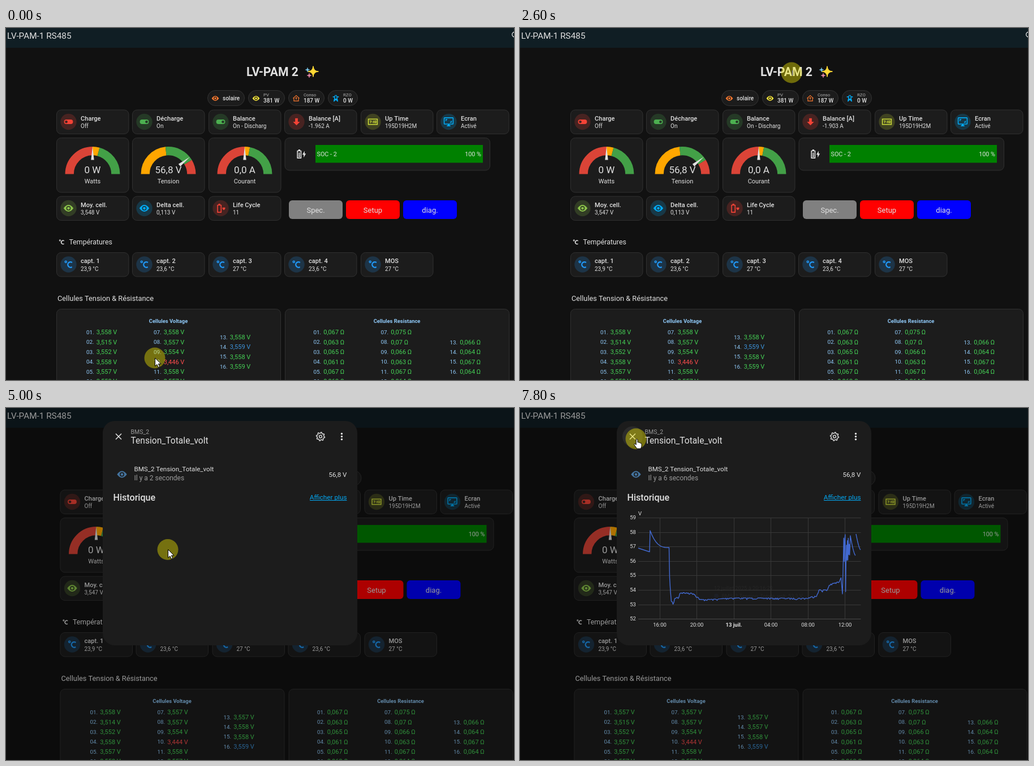
Animation, 898 px wide and 623 px high, one loop 8000 ms. Source, as an HTML page with a canvas:

```html
<!DOCTYPE html>
<html lang="fr">
<head>
<meta charset="utf-8">
<title>Tableau de bord batterie</title>
<style>
html, body { margin: 0; width: 100%; height: 100%; overflow: hidden; background: #111; }
canvas { display: block; }
</style>
</head>
<body>
<canvas id="stage" width="898" height="623"></canvas>
<script>
const g = document.getElementById('stage').getContext('2d');
const LOOP = 8000, STEP = 200, OPEN = 5000, LOADED = 5400;
const TAU = Math.PI * 2, RAD = Math.PI / 180;
const INK = '#e1e1e1', RED = '#f44336', GREEN = '#4caf50', BLUE = '#2196f3';
const ORANGE = '#ff7a2f', YELLOW = '#ffeb3b', SKY = '#03a9f4', LINE = '#4269d0';

function text(s, x, y, size, color = INK, weight = 400, align = 'left') {
  g.font = `${weight} ${size}px Roboto, sans-serif`;
  g.textAlign = align;
  g.fillStyle = color;
  g.fillText(s, x, y + size * 0.355);
}
function box(x, y, w, h, r, fill, border) {
  g.beginPath();
  g.roundRect(x, y, w, h, r);
  g.fillStyle = fill;
  g.fill();
  if (border) { g.strokeStyle = border; g.lineWidth = 1; g.stroke(); }
}
function disc(x, y, r, fill) {
  g.beginPath();
  g.arc(x, y, r, 0, TAU);
  g.fillStyle = fill;
  g.fill();
}
function circle(x, y, r, color) {
  g.beginPath();
  g.arc(x, y, r, 0, TAU);
  g.strokeStyle = color;
  g.lineWidth = 1.4;
  g.stroke();
}
function polyline(pts) {
  g.beginPath();
  pts.forEach(([x, y]) => g.lineTo(x, y));
}
function segment(x1, y1, x2, y2, color, width = 1) {
  polyline([[x1, y1], [x2, y2]]);
  g.strokeStyle = color;
  g.lineWidth = width;
  g.stroke();
}

// icons live on a 24 unit grid and are filled even-odd
const bar = (x, y, w, h, r = 0) => g.roundRect(x, y, w, h, r);
const ring = (x, y, r) => { g.moveTo(x + r, y); g.arc(x, y, r, 0, TAU); };
function poly(...p) {
  g.moveTo(p[0], p[1]);
  for (let i = 2; i < p.length; i += 2) g.lineTo(p[i], p[i + 1]);
  g.closePath();
}
function battery(x) {
  bar(x, 4, 10, 18, 1);
  bar(x + 2, 6, 6, 14);
  bar(x + 3, 2, 4, 2);
}
const ICONS = {
  eye() {
    g.moveTo(1, 12);
    g.quadraticCurveTo(12, -3, 23, 12);
    g.quadraticCurveTo(12, 27, 1, 12);
    ring(12, 12, 5);
    ring(12, 12, 3);
  },
  off() { bar(2, 7, 20, 10, 5); ring(7, 12, 3); },
  on() { bar(2, 7, 20, 10, 5); ring(17, 12, 3); },
  down() { poly(9, 4, 15, 4, 15, 12, 19.8, 12, 12, 19.8, 4.2, 12, 9, 12); },
  celsius() {
    ring(6, 6, 3);
    ring(6, 6, 1);
    g.moveTo(20.7, 6.3);
    g.arc(16.5, 12.5, 7.5, -56 * RAD, 59 * RAD, true);
    g.arc(16.5, 12.5, 4.5, 53 * RAD, -48 * RAD);
    g.closePath();
  },
  screen() {
    bar(1, 2, 22, 16, 2);
    bar(3, 4, 18, 12);
    bar(8, 20, 8, 2);
    bar(10, 18, 4, 2);
    poly(5, 6, 9, 6, 9, 8, 7, 8, 7, 10, 5, 10);
    poly(19, 14, 15, 14, 15, 12, 17, 12, 17, 10, 19, 10);
  },
  clock() {
    bar(1, 5, 22, 14);
    bar(3, 7, 18, 10);
    poly(4.5, 9, 9, 9, 9, 10.5, 7, 15, 5.5, 15, 7.4, 10.5, 4.5, 10.5);
    bar(10, 10, 1.3, 1.3);
    bar(10, 13, 1.3, 1.3);
    bar(12.7, 9, 1.7, 6);
    bar(15.6, 9, 4.2, 6);
    bar(17, 10.5, 1.3, 3);
  },
  heart() {
    battery(4);
    g.moveTo(19, 16);
    g.bezierCurveTo(13, 12, 17, 8, 19, 11);
    g.bezierCurveTo(21, 8, 25, 12, 19, 16);
  },
  charging() {
    battery(3);
    for (let i = 0; i < 3; i++) bar(6.2, 9 + i * 3.5, 3.6, 2.5);
    poly(20, 5, 15, 13.5, 18, 13.5, 18, 20, 23, 11, 20, 11);
  },
  house() {
    poly(12, 2, 1, 12, 4, 12, 4, 21, 20, 21, 20, 12, 23, 12);
    poly(12, 4.7, 18, 10, 18, 19, 6, 19, 6, 10);
    poly(12, 8, 8.5, 11.5, 11, 11.5, 11, 16, 13, 16, 13, 11.5, 15.5, 11.5);
  },
  tower() {
    poly(9, 2, 15, 2, 19, 22, 17, 22, 12, 17, 7, 22, 5, 22);
    poly(10.6, 4, 13.4, 4, 14.4, 13, 9.6, 13);
    bar(3, 6, 5, 3);
    bar(16, 6, 5, 3);
  }
};
function icon(name, x, y, size, color) {
  g.save();
  g.translate(x - size / 2, y - size / 2);
  g.scale(size / 24, size / 24);
  g.beginPath();
  ICONS[name]();
  g.fillStyle = color;
  g.fill('evenodd');
  g.restore();
}

const card = (x, y, w, h) => box(x + .5, y + .5, w - 1, h - 1, 8, '#1c1c1c', '#303030');
const column = i => Math.round(88.6 + i * 134.5);

function tile(col, y, name, color, title, value) {
  const x = column(col);
  card(x, y, 128.5, 43.5);
  g.globalAlpha = .2;
  disc(x + 21.5, y + 21.5, 14.2, color);
  g.globalAlpha = 1;
  icon(name, x + 21.5, y + 21.5, 19, color);
  text(title, x + 43, y + 15.5, 11.1, INK, 500);
  text(value, x + 43, y + 29.3, 10);
}

// bands: [colour, start angle, end angle] in degrees, 180 = left
function gauge(col, bands, needle, value, label) {
  const x = column(col), cx = x + 64, cy = 258.5;
  card(x, 194, 128.5, 97.5);
  for (const [color, from, to] of bands) {
    g.beginPath();
    g.arc(cx, cy, 40.8, -from * RAD, -to * RAD);
    g.strokeStyle = color;
    g.lineWidth = 15.3;
    g.stroke();
  }
  g.save();
  g.translate(cx, cy);
  g.rotate(-needle * RAD);
  polyline([[25, -2.7], [48.4, 0], [25, 2.7]]);
  g.fillStyle = INK;
  g.fill();
  g.restore();
  text(value, cx, 251, 17, INK, 400, 'center');
  text(label, cx, 271.3, 11, INK, 400, 'center');
}

function chip(x, w, name, color, label, value) {
  box(x + .5, 110.5, w - 1, 27, 13.5, '#1c1c1c', '#333');
  icon(name, x + 14, 124.5, 14, color);
  if (!label) return text(value, x + 27, 124.3, 10, INK, 500);
  text(label, x + 27, 118.5, 7.8, '#b0b0b0');
  text(value, x + 27, 128, 10, INK, 500);
}

function star(x, y, r, color) {
  g.beginPath();
  g.moveTo(x, y - r);
  for (let a = 0; a < TAU; a += TAU / 4) {
    g.quadraticCurveTo(x, y, x + r * Math.cos(a), y + r * Math.sin(a));
  }
  g.lineWidth = r * .16;
  g.strokeStyle = g.fillStyle = color;
  g.fill();
  g.stroke();
}

const VOLTS = '558 515 552 558 557 558 558 557 554 446 558 557 558 559 558 559'.split(' ');
const OHMS = '067 063 065 061 067 063 075 07 066 063 067 064 066 064 067 064'.split(' ');
// each listed cell loses 1 mV in the span: [from, to, cells]
const DIPS = [[2200, 7200, [2]], [3200, LOOP, [7, 10, 10, 13, 14]], [7200, LOOP, [1, 4, 6, 14]]];

function table(x, title, cols, lastY, values, unit, color) {
  box(x + .5, 497.5, 396, 140, 8, '#1c1c1c', '#303030');
  text(title, x + 198, 519, 9.4, '#90caf9', 700, 'center');
  values.forEach((v, i) => {
    const c = Math.floor(i / 6), y = (c == 2 ? lastY : 538.5) + (i % 6) * 17.4;
    text(String(i + 1).padStart(2, '0') + '.', cols[c], y, 9.9, '#90caf9');
    text(v + unit, cols[c] + 17.7, y, 11, color(i));
  });
}

function page(t) {
  const mv = VOLTS.map(Number);
  for (const [from, to, cells] of DIPS) {
    if (t >= from && t < to) cells.forEach(c => mv[c - 1]--);
  }
  const low = mv.indexOf(Math.min(...mv)), high = mv.indexOf(Math.max(...mv));
  const updated = t >= 2200;

  text('LV-PAM 2', 471, 77, 21.2, INK, 700, 'center');
  star(543, 77, 9.5, '#fdd835');
  star(533, 74, 3.8, '#81d4fa');
  star(536, 84, 4, '#f48fb1');

  chip(356, 66, 'eye', ORANGE, '', 'solaire');
  chip(428, 65, 'eye', YELLOW, 'PV', '381 W');
  chip(499, 64, 'house', ORANGE, 'Conso', '187 W');
  chip(569, 53, 'tower', SKY, 'RZO', '0 W');

  tile(0, 144.5, 'off', RED, 'Charge', 'Off');
  tile(1, 144.5, 'on', GREEN, 'Décharge', 'On');
  tile(2, 144.5, 'on', GREEN, 'Balance', 'On - Discharg');
  tile(3, 144.5, 'down', RED, 'Balance [A]', updated ? '-1.903 A' : '-1.962 A');
  tile(4, 144.5, 'clock', '#cddc39', 'Up Time', '195D19H2M');
  tile(5, 144.5, 'screen', SKY, 'Ecran', 'Activé');

  const r = '#db4437', o = '#ffa600', gr = '#43a047';
  gauge(0, [[r, 180, 90], [o, 90, 75], [gr, 75, 0]], 90, '0 W', 'Watts');
  gauge(1, [[o, 180, 96], [gr, 96, 31], [r, 31, 0]], 38.5, '56,8 V', 'Tension');
  gauge(2, [[r, 180, 90], [o, 90, 79], [gr, 79, 0]], 90, '0,0 A', 'Courant');

  card(492.5, 194, 363.5, 58.5);
  icon('charging', 521.5, 223, 19, INK);
  box(547, 207, 296, 31.5, 0, '#008000');
  text('SOC - 2', 549.5, 223, 10.8);
  text('100 %', 840, 223, 10.8, INK, 400, 'right');

  tile(0, 297.5, 'eye', '#8bc34a', 'Moy. cell.', updated ? '3,547 V' : '3,548 V');
  tile(1, 297.5, 'eye', SKY, 'Delta cell.', t < 3200 ? '0,113 V' : '0,115 V');
  tile(2, 297.5, 'heart', RED, 'Life Cycle', '11');
  [['Spec.', '#808080'], ['Setup', '#f00'], ['diag.', '#00f']].forEach(([s, c], i) => {
    box(500 + i * 101, 305, 95, 33, 6, c);
    text(s, 547.5 + i * 101, 322, 13, INK, 400, 'center');
  });

  icon('celsius', 98.5, 379, 12.5, INK);
  text('Températures', 111.5, 379, 12.4);
  ['23,9', '23,6', '27', '23,6', '27'].forEach((v, i) =>
    tile(i, 397, 'celsius', BLUE, i < 4 ? 'capt. ' + (i + 1) : 'MOS', v + ' °C'));

  text('Cellules Tension & Résistance', 91, 478, 12.8);
  table(89, 'Cellules Voltage', [142, 261, 378], 547, mv.map(v => '3,' + v), ' V',
    i => i == low ? '#ff4d4d' : i == high ? '#3d94dc' : '#45d155');
  table(493, 'Cellules Resistance', [543.5, 662.5, 784.5], 556, OHMS.map(v => '0,' + v), ' Ω', () => '#45d155');
}

function header(open) {
  box(0, 0, 898, 35, 0, '#101e24');
  text('LV-PAM-1 RS485', 2, 13.5, 15.3);
  if (!open) circle(899, 11.5, 4.3, INK);
}

const mix = (a, b, p) => a + (b - a) * p;
const smooth = p => p * p * (3 - 2 * p);

// interpolates rows [key, ...values]
function track(keys, k, ease = p => p) {
  const i = keys.findIndex(row => row[0] > k);
  if (i < 1) return keys.at(i).slice(1);
  const a = keys[i - 1], b = keys[i], p = ease((k - a[0]) / (b[0] - a[0]));
  return a.slice(1).map((v, n) => mix(v, b[n + 1], p));
}

// voltage history: charge decay, rippling night level, morning climb, spikes
function history() {
  let seed = 7;
  const rnd = () => (seed = seed * 16807 % 2147483647) / 2147483647;
  const pts = [[209, 248], [229, 254.5]];
  const decay = (x0, x1, y0, y1, pow) => {
    for (let p = 0; p <= 1; p += .1) pts.push([mix(x0, x1, p), mix(y1, y0, (1 - p) ** pow)]);
  };
  const spikes = (x0, x1) => {
    for (let x = x0, side = 1; x < x1; x += .8, side = -side) pts.push([x, 251 + side * (8 + 14 * rnd())]);
  };
  decay(230, 263.5, 217, 247, 3);
  const level = [[264.5, 300], [267, 342], [272, 344], [274, 335], [280, 335], [283, 326.5], [306, 327.5], [319, 339],
    [350, 338], [370, 336], [508, 336.5], [525, 331], [529, 321], [543, 322], [547, 312], [565, 307], [569, 293]];
  for (let x = 264.5; x < 569; x += 1.5) {
    const rough = x < 282 || x > 525 ? 5 : 3;
    const ripple = x < 268 ? 0 : rough * rnd() ** 3;
    pts.push([x, track(level, x)[0] + ripple]);
  }
  pts.push([570, 329]);
  spikes(571.5, 574.5);
  pts.push([574.8, 224], [575.6, 325]);
  spikes(576.3, 583);
  decay(584, 593, 226, 261, 1.5);
  const gap = pts.length;
  decay(594, 602, 223, 251, 1.5);
  return [pts.slice(0, gap), pts.slice(gap)];
}
const HISTORY = history();

// pointer stops: [time, x, y]
const STOPS = [[0, 263, 584], [400, 250, 574], [1200, 286, 267], [1400, 286, 267], [1600, 282.5, 196],
  [2400, 472, 75], [2600, 480, 79], [3800, 303, 246], [4600, 286, 250.5], [5200, 286, 250.5], [5600, 305.92, 296],
  [5800, 413, 285], [6600, 558.32, 285], [6800, 561, 283.5], [7400, 317, 318], [7600, 203, 65], [7800, 205, 54.5]];
const pointerAt = t => track(STOPS, t, smooth);

// the tooltip trails the pointer by one step and keeps its last place in the plot
function tooltip(t) {
  let u = t - STEP;
  while (u > LOADED && pointerAt(u)[1] < 194) u -= STEP;
  if (u < LOADED) return;
  const [lx, py] = pointerAt(u);
  const x = Math.round(lx < 428 ? lx + 18 : lx - 194.5), y = Math.round(py - 14);
  const left = u < t - STEP, fading = t >= 7600;
  const secs = Math.round(57600 + (lx - 247) / 65.5 * 14400);
  const two = n => String(Math.floor(n)).padStart(2, '0');
  const clock = [secs / 3600 % 24, secs / 60 % 60, secs % 60].map(two).join(':');
  const volts = (52 + (373.3 - track(HISTORY[0], lx)[0]) / 25.6).toFixed(1).replace('.', ',');
  if (!fading) {
    const mark = Math.floor(lx) + .5;
    g.setLineDash([3, 2]);
    segment(mark, 194, mark, 373, SKY);
    g.setLineDash([]);
  }
  g.globalAlpha = left ? .06 : fading ? .6 : 1;
  box(x - .5, y - .5, 174, 44, 4, 'rgba(28,28,28,.93)', '#343434');
  text(`${secs < 86400 ? 12 : 13} juillet 2025 à ${clock}`, x + 8, y + 15, 9.35);
  disc(x + 12, y + 28.5, 4, LINE);
  text(`BMS_2 Tension_Totale_volt: ${volts} V`, x + 21.5, y + 28.5, 9.3);
  g.globalAlpha = 1;
}

function chart() {
  for (let i = 0; i < 8; i++) {
    const y = 194 + Math.round(i * 25.6) + .5;
    segment(209, y, 602.5, y, i == 7 ? '#4a4a4a' : '#383838');
    text(59 - i, 205, y - .5, 9.6, INK, 400, 'right');
  }
  text('V', 212, 187, 9.6, INK, 400, 'center');
  ['16:00', '20:00', '13 juil.', '04:00', '08:00', '12:00'].forEach((s, i) => {
    const x = 247 + i * 65.5, grid = Math.floor(x) + .5;
    segment(grid, 194, grid, 373, '#383838');
    text(s, x, 383.5, 9.5, INK, i == 2 ? 700 : 400, 'center');
  });
  g.strokeStyle = LINE;
  g.lineWidth = 1.4;
  g.lineJoin = 'round';
  for (const part of HISTORY) { polyline(part); g.stroke(); }
}

function cog(x, y) {
  const pts = [];
  for (let i = 0; i < 32; i++) {
    const a = (i + .5) * TAU / 32, r = i % 4 < 2 ? 7.5 : 5.7;
    pts.push([x + r * Math.sin(a), y - r * Math.cos(a)]);
  }
  polyline(pts);
  g.closePath();
  g.strokeStyle = INK;
  g.lineWidth = 1.4;
  g.stroke();
  circle(x, y, 2.4, INK);
}

function dialog(t) {
  box(171, 23, 450, 397, 21, '#1c1c1c');
  if (t >= 7800) disc(199, 50.5, 18, '#2b2b2b');
  for (const d of [-5, 5]) segment(194, 50.5 - d, 204, 50.5 + d, INK, 1.6);
  text('BMS_2', 220.5, 42, 10.5, '#9b9b9b');
  text('Tension_Totale_volt', 220.5, 57, 15.6);
  cog(556, 50.5);
  for (const d of [-5, 0, 5]) disc(593.5, 50.5 + d, 1.7, INK);

  const age = 2 + [LOADED, 6000, 6600, 7600].filter(at => t >= at).length;
  icon('eye', 205, 117.5, 19, '#44739e');
  text('BMS_2 Tension_Totale_volt', 226.5, 108, 11.6);
  text(`Il y a ${age} secondes`, 226.5, 123.5, 12, '#9b9b9b');
  text('56,8 V', 602.5, 117.5, 11.6, INK, 400, 'right');
  text('Historique', 189.5, 158, 16.1, INK, 500);
  text('Afficher plus', 602.5, 157.5, 11.8, SKY, 400, 'right');
  segment(537, 163.5, 602.5, 163.5, SKY);
  if (t < LOADED) return;
  chart();
  tooltip(t);
}

const ARROW = new Path2D('M0 0V14.5L3.4 11.4L5.7 16.6L8.2 15.5L5.9 10.5H10.5Z');
const HAND = new Path2D('M3.2 1.5Q4.6 -.5 6 1.5V6.3Q7.5 5.4 8.4 6.9Q10 6.2 10.8 7.7Q12.8 7.3 13 9.3V13L11.5 17.5H4.8L1 12.2Q-1 9.6 .3 8.9Q1.6 8.5 3.2 10.6Z');

function pointer(t) {
  const [x, y] = pointerAt(t);
  disc(x, y, 18.5, 'rgba(240,230,0,.42)');
  if (t >= 2400 && t <= 2800) {
    segment(x + 1.5, y - 4, x + 1.5, y + 5, '#222', 2);
    segment(x + 1.5, y - 4, x + 1.5, y + 5, '#ddd', .8);
    return;
  }
  const hand = (t >= 1600 && t < 2000) || t >= 7600, shape = hand ? HAND : ARROW;
  g.save();
  g.translate(hand ? x - 3 : x + .5, y);
  g.lineWidth = 1;
  g.lineJoin = 'round';
  g.fillStyle = '#fff';
  g.strokeStyle = '#000';
  g.fill(shape);
  g.stroke(shape);
  g.restore();
}

function draw(now) {
  const t = Math.floor(now % LOOP / STEP) * STEP, open = t >= OPEN;
  box(0, 0, 898, 623, 0, '#111');
  g.save();
  if (open) g.translate(6.5, 0);
  page(t);
  g.restore();
  header(open);
  if (open) {
    box(0, 0, 898, 623, 0, 'rgba(0,0,0,.32)');
    dialog(t);
  }
  pointer(t);
}

const start = performance.now();
function tick() {
  draw(performance.now() - start);
  requestAnimationFrame(tick);
}
tick();
</script>
</body>
</html>
```
